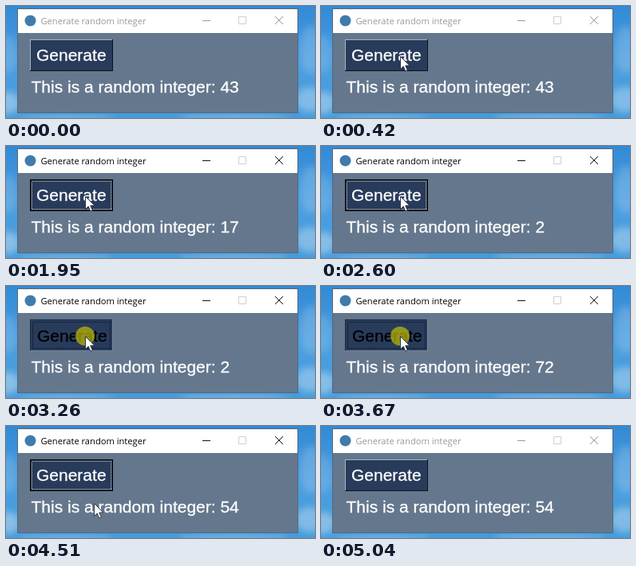
An HTML page for the animation above (5.08 s loop, 387x141 px).

```html
<!DOCTYPE html>
<html lang="en">
<head>
<meta charset="utf-8">
<title>Generate random integer</title>
<style>
  html, body { margin: 0; width: 100%; height: 100%; overflow: hidden; }
  svg { display: block; width: 387px; height: 141px; }
  .title { font: 11.15px "Open Sans", "Noto Sans", sans-serif; }
  .big { font: 21px "Liberation Sans", Arial, sans-serif; stroke-width: .3; }
  .crisp { shape-rendering: crispEdges; }
</style>
</head>
<body>
<svg viewBox="0 0 387 141" xmlns="http://www.w3.org/2000/svg">
  <defs>
    <linearGradient id="sky" x2="0" y2="1">
      <stop offset="0" stop-color="#328ad6"/>
      <stop offset=".5" stop-color="#4c9edf"/>
      <stop offset="1" stop-color="#459bdb"/>
    </linearGradient>
    <filter id="soft" x="-50%" y="-100%" width="200%" height="300%"><feGaussianBlur stdDeviation="4"/></filter>
  </defs>

  <rect width="387" height="141" fill="url(#sky)"/>
  <g fill="#c8e0f2" filter="url(#soft)">
    <ellipse cx="2" cy="122" rx="16" ry="14" opacity=".5"/>
    <ellipse cx="2" cy="60" rx="12" ry="24" opacity=".2"/>
    <ellipse cx="380" cy="118" rx="18" ry="16" opacity=".45"/>
    <ellipse cx="382" cy="55" rx="14" ry="30" opacity=".25"/>
    <ellipse cx="285" cy="141" rx="70" ry="5" opacity=".35"/>
    <ellipse cx="75" cy="142" rx="60" ry="5" opacity=".35"/>
  </g>

  <g class="crisp">
    <rect x="14" y="3" width="352" height="132" fill="#53687c"/>
    <rect x="15" y="4" width="350" height="30" fill="#fff"/>
    <rect x="15" y="34" width="350" height="100" fill="#64778d"/>
  </g>
  <circle cx="30.5" cy="18.5" r="7" fill="#3f7cac"/>
  <text id="title" class="title" x="43.5" y="23">Generate random integer</text>
  <g id="controls" fill="none">
    <path d="M246 18.5h10"/>
    <path d="M337 13l10 10m0-10l-10 10"/>
  </g>
  <path d="M291.5 13.5h9v9h-9z" fill="none" stroke="#d0d0d0"/>

  <g class="crisp" fill="none">
    <rect x="30" y="42" width="104" height="40" fill="#283b5b"/>
    <path id="lightEdge"/>
    <path id="darkEdge"/>
    <rect id="focus" stroke-dasharray="1 1"/>
  </g>
  <text id="label" class="big">Generate</text>
  <text id="result" class="big" x="31.5" y="109" fill="#fff" stroke="#fff"></text>

  <circle id="halo" cx="99" cy="63" r="12" fill="#c8c400" opacity=".67"/>
  <path id="cursor" d="M.5 .5v16l3.7-3.5 2.6 6 2.5-1.1-2.6-5.9h5.1z" fill="#fff" stroke="#222b3b" stroke-width=".9"/>
</svg>
<script>
const LOOP = 5080;
const ACTIVATE = 550, DEACTIVATE = 5040;
const HOME = { x: 99, y: 63 };
const AWAY = { x: 116, y: 114 };

// press time, release time, number shown after release
const clicks = [
  [550, 650, 93], [1260, 1340, 58], [1850, 1950, 17], [2550, 2600, 2],
  [3260, 3310, 72], [3670, 3770, 9], [4280, 4380, 54]
];

// edge colours and label offset of the button in each state
const looks = {
  idle: { light: "#a9b3c0", dark: "#0b111c", text: "#fff", shift: 0 },
  focused: { light: "#000", dark: "#000", text: "#fff", shift: 0, dots: "#d7c4a4" },
  pressed: { light: "#1c2a43", dark: "#74859b", text: "#000", shift: 1, dots: "#080c14" }
};

const $ = id => document.getElementById(id);
function set(id, attrs) {
  for (const key in attrs) $(id).setAttribute(key, attrs[key]);
}
const show = (id, on) => set(id, { visibility: on ? "visible" : "hidden" });
const easeOut = p => 1 - (1 - p) ** 2;

// 0 = over the button, 1 = at the lower edge, null = out of view
function cursorDistance(t) {
  if (t < 90 || t >= 4580) return null;
  if (t < 420) return 1 - easeOut(Math.floor((t - 90) / 47) / 7);
  if (t < 4420) return 0;
  return ((Math.floor((t - 4420) / 40) + 1) / 4) ** 1.4;
}

function drawButton(look) {
  const { light, dark, text, shift, dots } = look;
  set("lightEdge", { d: "M30.5 82V42.5H134", stroke: light });
  set("darkEdge", { d: "M30 81.5H133.5V42", stroke: dark });
  set("focus", {
    x: 32.5 + shift, y: 44.5 + shift,
    width: 99 - 2 * shift, height: 35 - 2 * shift,
    stroke: dots || "none"
  });
  set("label", { x: 38 + shift, y: 69 + shift, fill: text, stroke: text });
}

function draw(t) {
  const active = t >= ACTIVATE && t < DEACTIVATE;
  const pressed = clicks.some(([down, up]) => t >= down && t < up);
  const number = clicks.reduce((n, [, up, next]) => t >= up ? next : n, 43);

  set("title", { fill: active ? "#000" : "#999" });
  set("controls", { stroke: active ? "#111" : "#999" });
  drawButton(pressed ? looks.pressed : active ? looks.focused : looks.idle);
  $("result").textContent = "This is a random integer: " + number;
  show("halo", pressed);

  const far = cursorDistance(t);
  show("cursor", far !== null);
  if (far !== null) {
    const x = HOME.x + (AWAY.x - HOME.x) * far;
    const y = HOME.y + (AWAY.y - HOME.y) * far;
    set("cursor", { transform: `translate(${Math.round(x)} ${Math.round(y)})` });
  }
}

const start = performance.now();
function tick() {
  draw((performance.now() - start) % LOOP);
  requestAnimationFrame(tick);
}
tick();
</script>
</body>
</html>
```
